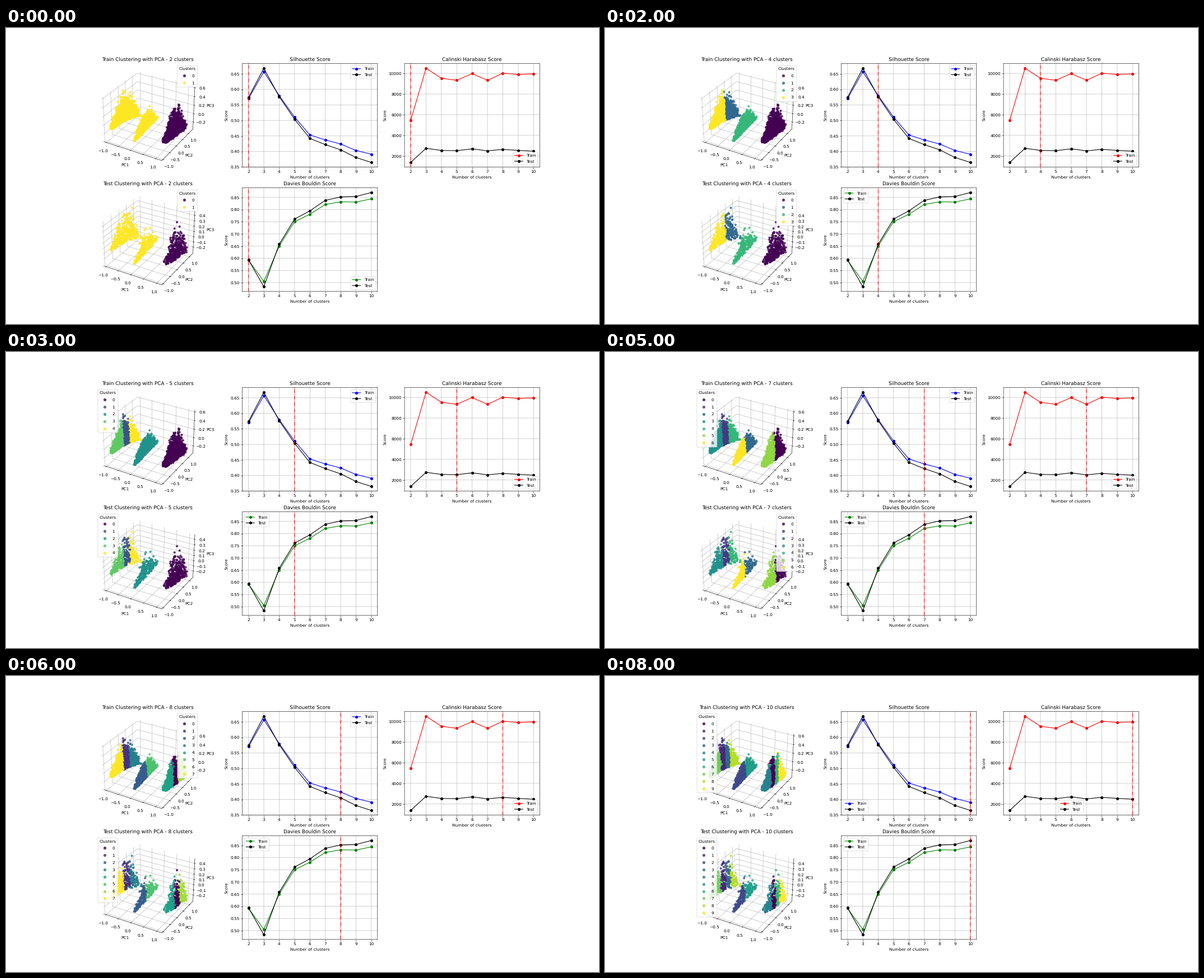
A matplotlib script that plays this animation: 1058 px wide and 529 px high, repeating every 9000 ms.

```python
import numpy as np
import matplotlib.pyplot as plt
from matplotlib.animation import FuncAnimation

plt.rcParams.update({"text.hinting": "none", "path.snap": False})

KS = np.arange(2, 11)
STEP = KS - 2
PEAK = np.exp(-4 * (KS - 3) ** 2)  # the test set scores best at k = 3

# Cluster numbers inside each fin, in order of growing PC2.
GROUPS = {
    2: ("1", "1", "0"), 3: ("1", "2", "0"), 4: ("31", "2", "0"),
    5: ("314", "2", "0"), 6: ("314", "2", "50"), 7: ("314", "62", "50"),
    8: ("713", "25", "406"), 9: ("7138", "25", "406"),
    10: ("7138", "25", "4069"),
}

rng = np.random.default_rng(7)
fig = plt.figure(figsize=(20, 10), dpi=52.9)


def fin(n, pc1, start, end, base, slope, bend, height):
    """An upright sheet of points along PC2, thin at its tip."""
    u = rng.beta(2, 2.6, n)
    top = height * (.08 + np.sin(np.pi * u))
    x = rng.normal(pc1, .025, n)
    y = start + (end - start) * u
    z = base + slope * u ** bend + top * rng.beta(1.3, 4, n)
    return np.array([x, y, z])


def split(y, names):
    """Cut a fin across PC2 and number its slices."""
    m = len(names)
    cuts = np.quantile(y, (np.arange(1, m) / m) ** .8)
    return np.array([int(c) for c in names])[np.digitize(y, cuts)]


class Cloud:
    """A 3D scatter whose colours follow the number of clusters."""

    def __init__(self, pos, name, n, floor, xlim, ylim, zlim, zticks, right):
        self.name = name
        self.right = right
        self.dots = None
        self.ax = ax = fig.add_subplot(2, 3, pos, projection="3d")
        ax.set(xlim=xlim, ylim=ylim, zlim=zlim, zticks=zticks,
               xlabel="PC1", ylabel="PC2", zlabel="PC3")
        for axis in (ax.xaxis, ax.yaxis, ax.zaxis):
            axis.set_pane_color("white")
        self.fins = [
            fin(n, -.87, -.97, 1.19, floor - .09, -.26, 2, .78),
            fin(n * 2 // 3, 0, -.85, .91, floor - .24, .07, 1, .52),
            fin(n, 1.07, -.71, 1.18, floor - .07, -.22, .4, .82),
        ]

    def show(self, k):
        if self.dots is not None:
            self.dots.remove()
        labels = [split(f[1], names)
                  for f, names in zip(self.fins, GROUPS[k])]
        self.dots = self.ax.scatter(*np.hstack(self.fins),
                                    c=np.concatenate(labels),
                                    cmap="viridis", alpha=.8)
        self.ax.set_title(f"{self.name} Clustering with PCA - {k} clusters")
        side = "right" if k in self.right else "left"
        self.ax.legend(*self.dots.legend_elements(num=None),
                       title="Clusters", loc=f"upper {side}")


class Score:
    """Train and test curves with a marker line at the current k."""

    def __init__(self, pos, title, train, test, color, early, late, turn):
        self.early, self.late, self.turn = early, late, turn
        self.ax = ax = fig.add_subplot(2, 3, pos)
        ax.plot(KS, train, "o-", color=color, label="Train")
        ax.plot(KS, test, "o-", color="black", label="Test")
        ax.set(title=title, xlabel="Number of clusters", ylabel="Score",
               xticks=KS)
        ax.grid(True)
        self.mark = ax.axvline(KS[0], color="red", linestyle="-.")

    def show(self, k):
        self.mark.set_xdata([k, k])
        self.ax.legend(loc=self.early if k < self.turn else self.late)


silhouette = np.array([.570, .657, .580, .511, .453, .437, .424, .403, .391])
calinski = np.array([5440, 10500, 9530, 9330, 9980, 9330, 10020, 9900, 9950])
davies = np.array([.592, .505, .650, .750, .781, .821, .832, .831, .844])

panels = [
    Cloud(1, "Train", 1600, 0, (-1.118, 1.235), (-1.083, 1.397),
          (-.369, .638), np.arange(-.2, .7, .2), (2, 3, 4, 8)),
    Cloud(4, "Test", 360, .05, (-1.105, 1.195), (-1.083, 1.287),
          (-.322, .490), np.arange(-.2, .45, .1), (2, 3, 4, 7)),
    Score(2, "Silhouette Score", silhouette,
          silhouette + .004 - .0038 * STEP + .011 * PEAK,
          "blue", "upper right", "lower left", 9),
    Score(3, "Calinski Harabasz Score", calinski,
          calinski * (.27 - .0012 * (STEP - 3.7) ** 2),
          "red", "lower right", "lower center", 9),
    Score(5, "Davies Bouldin Score", davies,
          davies + .002 + .003 * STEP - .027 * PEAK,
          "green", "lower right", "upper left", 4),
]


def update(i):
    for panel in panels:
        panel.show(int(KS[i]))
    return []


anim = FuncAnimation(fig, update, frames=len(KS), interval=1000,
                     repeat=True, repeat_delay=0, blit=False)
plt.show()
```
